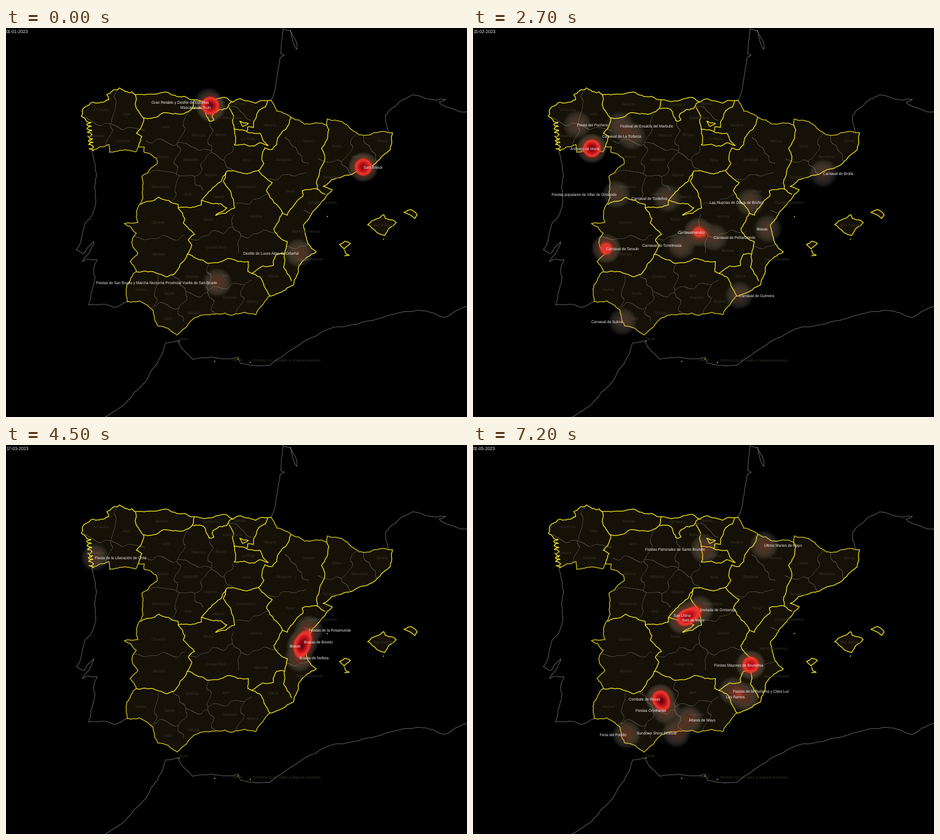
These frames come from a looping animation (814 by 688 pixels, 8 s). A matplotlib script:

```python
import matplotlib.pyplot as plt
import numpy as np
from matplotlib.animation import FuncAnimation
from matplotlib.collections import LineCollection

W, H, DPI = 814, 688, 64
PT = 72 / DPI
FRAMES, INTERVAL, HOLD = 80, 100, 9
RADIUS = 28
START, LATE, END = 0, 0.75, 1  # part of a label that lies left of its spot

plt.rcParams["font.family"] = "Liberation Sans"
plt.rcParams["text.hinting"] = "none"
rng = np.random.default_rng(7)


def rgb(r, g, b):
    return r / 255, g / 255, b / 255


def wiggle(*xy, amp=0.1):
    """Fractal line: each midpoint moves sideways by a share of its segment."""
    pts = np.array(xy, float).reshape(-1, 2)
    for _ in range(4):
        d = np.diff(pts, axis=0)
        side = np.column_stack([-d[:, 1], d[:, 0]])
        mid = pts[:-1] + d / 2 + side * rng.uniform(-amp, amp, (len(d), 1))
        joined = np.empty((2 * len(pts) - 1, 2))
        joined[::2], joined[1::2] = pts, mid
        pts = joined
    return pts


def rias(top=167, bottom=217, count=15):
    """Saw-toothed inlets of the west coast, from south to north."""
    y = np.linspace(bottom, top, count)
    x = 151 - 5 * np.linspace(0, 1, count) + 4 * (-1) ** np.arange(count)
    return wiggle(*np.column_stack([x, y]).ravel(), amp=0.25)


COASTS = [
    rias(),
    wiggle(150, 167, 133, 156, 138, 141, 166, 132, 181, 127, 178, 118, 200, 106,
           223, 113, 229, 118, amp=0.2),
    wiggle(229, 118, 262, 117, 283, 113, 297, 119, 332, 127, 366, 128, 388, 123,
           401, 131, 414, 125, 440, 133, 468, 128),
    wiggle(682, 185, 678, 216, 634, 249, 594, 263, 560, 280, 576, 286, 545, 322,
           525, 349, 533, 381, 548, 396, 517, 421, 507, 455, 466, 474),
]
FRONTIERS = [
    wiggle(468, 128, 478, 147, 503, 158, 528, 170, 566, 172, 567, 161, 600, 170,
           624, 189, 658, 184, 682, 185),
    wiggle(466, 474, 441, 507, 422, 503, 400, 508, 343, 508, 302, 543, 268, 527,
           260, 500, 237, 483, 214, 484),
    wiggle(214, 484, 213, 455, 230, 431, 219, 413, 233, 398, 222, 379, 230, 363,
           209, 346, 233, 344, 231, 322, 242, 300, 240, 262, 267, 240, 265, 230,
           244, 220, 244, 210, 234, 210, 229, 219, 183, 220, 182, 206, 152, 217),
]
OUTLINE = COASTS[:3] + FRONTIERS[:1] + COASTS[3:] + FRONTIERS[1:]

ISLANDS = [
    wiggle(639, 348, 667, 330, 670, 337, 689, 344, 669, 367, 639, 348),
    wiggle(703, 326, 715, 321, 726, 331, 722, 337, 703, 326),
    wiggle(589, 383, 598, 377, 608, 381, 597, 391, 589, 383),
    wiggle(598, 393, 601, 400, 606, 402, 598, 403),
]
ISLETS = [(666, 373), (567, 333), (305, 553), (409, 585), (368, 589), (431, 591)]

# Borders between regions, from north-west to south-east
REGIONS = [
    wiggle(229, 118, 228, 135, 243, 159, 238, 178, 230, 186, 240, 192, 234, 210),
    wiggle(243, 159, 267, 157, 277, 150, 313, 152, 329, 142, 332, 127),
    wiggle(329, 142, 352, 148, 358, 164, 367, 163, 366, 151, 388, 143, 401, 131, amp=0.2),
    wiggle(394, 141, 402, 155, 400, 165, 403, 179),
    wiggle(403, 179, 425, 183, 448, 186, 463, 208, 447, 203, 437, 209, 403, 207, 403, 179),
    wiggle(413, 165, 428, 169, 418, 174, 413, 165),
    wiggle(462, 129, 458, 140, 446, 146, 437, 166, 437, 176, 427, 175, 425, 183),
    wiggle(503, 158, 494, 179, 480, 194, 478, 206, 470, 215, 457, 212),
    wiggle(457, 212, 452, 229, 455, 240, 446, 252, 470, 273, 460, 288, 488, 327),
    wiggle(446, 252, 390, 253, 362, 287, 345, 305, 380, 311, 390, 318, 370, 331,
           404, 318, 402, 306, 384, 272, 388, 257),
    wiggle(238, 312, 270, 299, 304, 312, 304, 318, 345, 313, 345, 305),
    wiggle(304, 318, 316, 337, 313, 345, 333, 365, 322, 375, 328, 384, 320, 400),
    wiggle(230, 431, 260, 431, 285, 440, 296, 436, 320, 400, 355, 416, 428, 413,
           427, 431, 449, 441, 466, 474),
    wiggle(434, 434, 453, 421, 472, 420, 478, 400, 492, 400, 490, 422, 504, 447),
    wiggle(488, 327, 473, 355, 486, 373, 497, 378, 492, 400),
    wiggle(488, 327, 497, 331, 502, 320, 524, 298, 523, 288, 550, 285, 563, 294),
    wiggle(566, 172, 570, 180, 557, 213, 563, 226, 548, 274, 550, 285),
]

NEIGHBOURS = [
    wiggle(152, 217, 160, 262, 158, 290, 135, 362, 124, 392, 136, 399, 155, 378,
           148, 396, 135, 413, 161, 410, 156, 450, 146, 490, 190, 494, 214, 484),
    wiggle(468, 128, 473, 117, 484, 53, 491, 48, 485, 45, 489, 0, amp=0.04),
    wiggle(490, 2, 502, 4, 514, 31, 514, 38, 506, 22, 502, 4),
    wiggle(676, 185, 670, 155, 677, 146, 718, 118, 748, 126, 776, 126, 765, 131,
           778, 140, 814, 148),
    wiggle(175, 688, 210, 665, 247, 625, 282, 557, 302, 553, 330, 586, 398, 585,
           410, 582, 414, 593, 465, 597, 492, 578, 580, 529, 635, 519, 730, 499,
           775, 512, 814, 492, amp=0.05),
]

# Provinces, one row for each region
PLACES = [
    [("A Coruña", 168, 144), ("Lugo", 213, 152), ("Ourense", 206, 199), ("Pontevedra", 157, 190)],
    [("Asturias", 276, 134)], [("Cantabria", 362, 135)], [("Navarra", 466, 171)],
    [("Bizkaia", 413, 133), ("Araba/Álava", 400, 158)], [("La Rioja", 428, 195)],
    [("León", 283, 174), ("Palencia", 340, 189), ("Burgos", 380, 189), ("Soria", 425, 233),
     ("Zamora", 277, 227), ("Valladolid", 326, 232), ("Segovia", 361, 259),
     ("Salamanca", 273, 280), ("Ávila", 322, 293)],
    [("Madrid", 375, 298)],
    [("Guadalajara", 423, 280), ("Toledo", 357, 338), ("Cuenca", 442, 332),
     ("Ciudad Real", 371, 387), ("Albacete", 451, 393)],
    [("Huesca", 534, 199), ("Zaragoza", 491, 233), ("Teruel", 502, 288)],
    [("Lleida", 583, 208), ("Girona", 664, 199), ("Barcelona", 624, 227), ("Tarragona", 573, 264)],
    [("Castelló/Castellón", 559, 308), ("València/Valencia", 530, 359),
     ("Alacant/Alicante", 537, 408)],
    [("Cáceres", 269, 343), ("Badajoz", 270, 399)], [("Murcia", 472, 438)],
    [("Huelva", 239, 462), ("Sevilla", 289, 469), ("Córdoba", 328, 439), ("Jaén", 388, 437),
     ("Cádiz", 286, 513), ("Málaga", 331, 503), ("Granada", 395, 476), ("Almería", 435, 483)],
    [("Illes Balears", 667, 348)], [("Ceuta", 313, 549)], [("Melilla", 409, 586)],
    [("Territorio no asociado a ninguna provincia", 495, 587)],
]

DATES = ["01-01-2023", "16-01-2023", "31-01-2023", "15-02-2023", "02-03-2023",
         "17-03-2023", "01-04-2023", "16-04-2023", "01-05-2023"]

# first step, last step, name, spot x, y, label placement, weight
EVENTS = [
    (0, 0, "Gran Retablo y Desfile de Estrellas", 358, 131, END, 1),
    (0, 0, "Mascarón de Trulo", 362, 140, END, 2.2),
    (0, 0, "Sant Bresol", 631, 246, START, 2.9),
    (0, 0, "Desfile de Luces Altas de Orbeñal", 517, 398, END, 1),
    (0, 0, "Fiestas de San Bruelo y Marcha Nocturna Provincial Vuelta de San Bruelo",
     373, 450, END, 1),
    (1, 1, "Sant Bresol", 631, 245, START, 1),
    (1, 3, "Fiesta del Pochero", 184, 171, START, 1),
    (1, 3, "Festival de Ensalzo del Marbullo", 260, 173, START, 1),
    (1, 3, "Carnaval de La Torbeza", 280, 191, LATE, 1),
    (1, 1, "Antruejo de Morle", 214, 217, END, 1),
    (2, 3, "Antruejo de Morle", 210, 213, LATE, 4),
    (1, 1, "Timbalería", 441, 141, START, 1),
    (1, 3, "Fiestas populares de Villar de Ormundo", 253, 294, END, 1),
    (1, 1, "Zurrambles", 284, 319, END, 1),
    (1, 1, "Las Maruñetas", 249, 336, START, 1),
    (1, 1, "Carnavalmendro", 398, 360, END, 2.5),
    (2, 3, "Carnavalmendro", 398, 361, LATE, 2.4),
    (1, 1, "Carnaval de Peñarboledo", 425, 370, END, 1),
    (2, 3, "Carnaval de Peñarboledo", 425, 370, START, 1),
    (1, 1, "Carnaval de Torrelmeda", 368, 384, LATE, 1),
    (2, 3, "Carnaval de Torrelmeda", 368, 384, END, 1),
    (1, 1, "Fiestas Mayores en recuerdo a San Olvidio Prior", 513, 384, LATE, 1),
    (1, 1, "Carnaval de Tarvulo", 235, 388, START, 1),
    (2, 3, "Carnaval de Tarvulo", 235, 390, START, 2.6),
    (1, 1, "Fiesta de las Rondallas de Tormuña", 453, 438, START, 1),
    (1, 1, "San Brulo", 373, 450, START, 1),
    (2, 3, "Carnaval de Brolla", 618, 257, START, 1),
    (2, 3, "Carnaval de Tordeños", 343, 301, END, 1),
    (3, 3, "Las Nupcias de Olaya de Brúñez", 489, 308, LATE, 1),
    (3, 3, "Brasas", 521, 355, END, 1),
    (3, 3, "Carnaval de Gulmera", 470, 473, START, 1),
    (2, 3, "Carnaval de Sulma", 264, 519, END, 1),
    (5, 5, "Fiesta de la Liberación de Orda", 157, 199, START, 1),
    (4, 5, "Brasas", 521, 355, END, 2),
    (4, 5, "Fiestas de la Rosamunda", 535, 327, START, 1.6),
    (4, 5, "Brasas de Brivelo", 526, 348, START, 2),
    (4, 5, "Brasas de Nolbea", 518, 376, START, 1.6),
    (6, 6, "Retablo Viviente de Puerto Ormales", 398, 127, START, 1),
    (6, 6, "Los Velados de San Brulio de la Tormenera", 417, 178, START, 1),
    (6, 6, "Semana Solar Torvelitana", 453, 196, END, 1),
    (6, 6, "Saltarín de Borme", 467, 209, START, 1),
    (6, 6, "La Subida del Lucero", 342, 233, LATE, 1),
    (6, 6, "Senda del Timbal y la Caja", 516, 260, LATE, 1),
    (6, 6, "El Ciruelo Blanco", 270, 322, LATE, 1),
    (6, 6, "Semana Solar Costeña", 521, 355, END, 1),
    (6, 6, "Romería del Domingo de Cañas de Turbe", 507, 424, START, 1),
    (6, 6, "Semana Solar en Pastrumel", 494, 435, START, 6),
    (7, 8, "Fiestas Patronales de Santo Brumilo", 409, 184, END, 1),
    (8, 8, "Último Martes de Mayo", 514, 177, START, 1),
    (8, 8, "Jinetada de Ormienda", 400, 291, START, 1),
    (8, 8, "San Ulbrio", 384, 301, END, 1.6),
    (8, 8, "Seis de Mayo", 369, 309, START, 1.6),
    (8, 8, "Fiestas Mayores de Brumelsa", 490, 389, LATE, 2.5),
    (7, 8, "Fiestas de la Purísima y Clara Luz", 459, 435, START, 1),
    (8, 8, "Los Ramos", 480, 445, END, 1),
    (8, 8, "Combate de Rosas", 331, 449, END, 2.6),
    (7, 8, "Fiestas Orvelianas", 341, 469, END, 1),
    (8, 8, "Altares de Mayo", 381, 486, START, 1),
    (8, 8, "Sundown Shore Festival", 359, 509, END, 1),
    (7, 8, "Feria del Potrillo", 271, 512, END, 1),
]

WEEK = [
    ("Trivelo", 207, 111, START), ("Mundal", 178, 124, START), ("Druán", 295, 175, LATE),
    ("Umbriga", 273, 184, END), ("Molvarda", 340, 212, START),
    ("Valdura de Fosmeco", 318, 218, END), ("Pelumbria", 499, 235, LATE),
    ("Lubera", 286, 243, END), ("Valdura del Prino", 323, 254, END),
    ("Torremuña", 290, 269, END), ("Drumbeda", 358, 270, START), ("Ormil", 333, 292, END),
    ("Torva de Luminar", 391, 302, END), ("Dosmal", 489, 310, END), ("Ubriz", 385, 327, END),
    ("Tolupa", 463, 325, END), ("Brivelo", 526, 348, START), ("Mondula", 260, 359, END),
    ("Nolbea", 518, 373, START), ("Torre Brunal", 367, 382, START), ("Burleo", 548, 383, END),
    ("Lotuña", 234, 388, START), ("Drapuz", 463, 410, END), ("Bordaca", 480, 415, START),
    ("Drovez de los Candeleros", 242, 419, END), ("Pluza", 476, 424, END),
    ("Murda", 463, 456, END), ("Tulmo", 349, 458, END), ("Cormuza", 277, 475, END),
    ("Pilorba", 380, 487, END), ("Vadolento", 350, 498, END), ("Tolbura", 430, 500, START),
    ("Drovez de la Montera", 270, 513, END),
]
EVENTS += [(6, 6, "Semana Solar en " + town, *spot, 1) for town, *spot in WEEK]

# value, r, g, b, opacity
RAMP = np.array([
    (0, 255, 245, 240, 0), (.05, 255, 235, 225, .1), (.12, 245, 215, 200, .16),
    (.3, 200, 115, 90, .33), (.44, 230, 90, 65, .45), (.53, 240, 60, 48, .9),
    (.65, 239, 50, 44, 1), (.78, 203, 24, 29, 1), (.9, 165, 15, 21, 1), (1, 103, 0, 13, 1),
])
yy, xx = np.mgrid[0:H, 0:W] + 0.5


def is_on(event, step):
    return event[0] <= step <= event[1]


def heat(step):
    """RGBA layer of summed quartic kernels, scaled to the hottest spot."""
    total = np.zeros((H, W))
    for _, _, _, x, y, _, weight in (e for e in EVENTS if is_on(e, step)):
        d2 = (xx - x) ** 2 + (yy - y) ** 2
        total += weight * np.clip(1 - d2 / RADIUS ** 2, 0, None) ** 2
    total /= max(total.max(), 2.5)
    layers = [np.interp(total, RAMP[:, 0], RAMP[:, k]) for k in range(1, 5)]
    layers[3] *= 255
    return np.dstack(layers).round().astype(np.uint8)


def province_lines():
    """Wavy borders halfway between the provinces of one region."""
    seeds = [(x, y, k) for k, row in enumerate(PLACES) for _, x, y in row]
    u = xx + 3 * np.sin(yy / 6) + 2 * np.sin((xx + yy) / 4)
    v = yy + 3 * np.sin(xx / 7) + 2 * np.sin((xx - yy) / 5)
    owner = np.argmin([(u - x) ** 2 + (v - y) ** 2 for x, y, _ in seeds], axis=0)
    region = np.array([k for *_, k in seeds])[owner]
    image = np.zeros((H, W, 4), np.uint8)
    for axis in (0, 1):
        near = np.roll(owner, 1, axis)
        same = np.roll(region, 1, axis) == region
        image[(near != owner) & same] = (70, 68, 60, 255)
    return image


fig = plt.figure(figsize=(W / DPI, H / DPI), dpi=DPI, facecolor="black")
ax = fig.add_axes([0, 0, 1, 1])
ax.axis("off")


def show(image, z):
    return ax.imshow(image, extent=(0, W, H, 0), interpolation="nearest",
                     aspect="auto", zorder=z)


def strokes(lines, color, px, z):
    ax.add_collection(LineCollection(lines, colors=[color], linewidths=px * PT,
                                     capstyle="round", joinstyle="round", zorder=z))


def label(x, y, text, color, ha="left", px=6.5, z=6):
    return ax.text(x, y, text, color=color, ha=ha, va="center_baseline",
                   fontsize=px * PT, zorder=z)


borders = show(province_lines(), 2)
layers = [heat(step) for step in range(len(DATES))]
layer = show(layers[0], 5)
ax.set(xlim=(0, W), ylim=(H, 0))

YELLOW, OCHRE = rgb(238, 225, 32), rgb(205, 190, 32)
land = [ax.fill(*shape.T, color=rgb(21, 17, 6), lw=0, zorder=1)[0]
        for shape in [np.vstack(OUTLINE)] + ISLANDS]
borders.set_clip_path(land[0])
strokes(NEIGHBOURS, rgb(125, 125, 125), 0.8, 2)
strokes(FRONTIERS, OCHRE, 1.4, 3)
strokes(REGIONS + COASTS + ISLANDS, YELLOW, 1.4, 3)
ax.plot(*zip(*ISLETS), "o", color=YELLOW, ms=2 * PT, mew=0, zorder=3)

place_texts = [label(x, y, name, rgb(55, 52, 43), "center", z=4)
               for row in PLACES for name, x, y in row]
event_texts = [label(x, y, name, rgb(240, 240, 240)) for _, _, name, x, y, _, _ in EVENTS]
date_text = label(0, 6.5, DATES[0], rgb(235, 235, 235), px=7.8)

fig.canvas.draw()
for event, text in zip(EVENTS, event_texts):
    text.set_x(event[3] - event[5] * text.get_window_extent().width)
place_boxes = [t.get_window_extent() for t in place_texts]
event_boxes = [t.get_window_extent() for t in event_texts]


def update(frame):
    step = frame // HOLD
    layer.set_data(layers[step])
    date_text.set_text(DATES[step])
    taken = []
    for event, text, box in zip(EVENTS, event_texts, event_boxes):
        text.set_visible(is_on(event, step))
        if is_on(event, step):
            taken.append(box)
    # A province name gives way to event labels
    for text, box in zip(place_texts, place_boxes):
        text.set_visible(not box.count_overlaps(taken))
    return []


anim = FuncAnimation(fig, update, frames=FRAMES, interval=INTERVAL,
                     repeat=True, repeat_delay=0, init_func=lambda: update(0))
plt.show()
```
